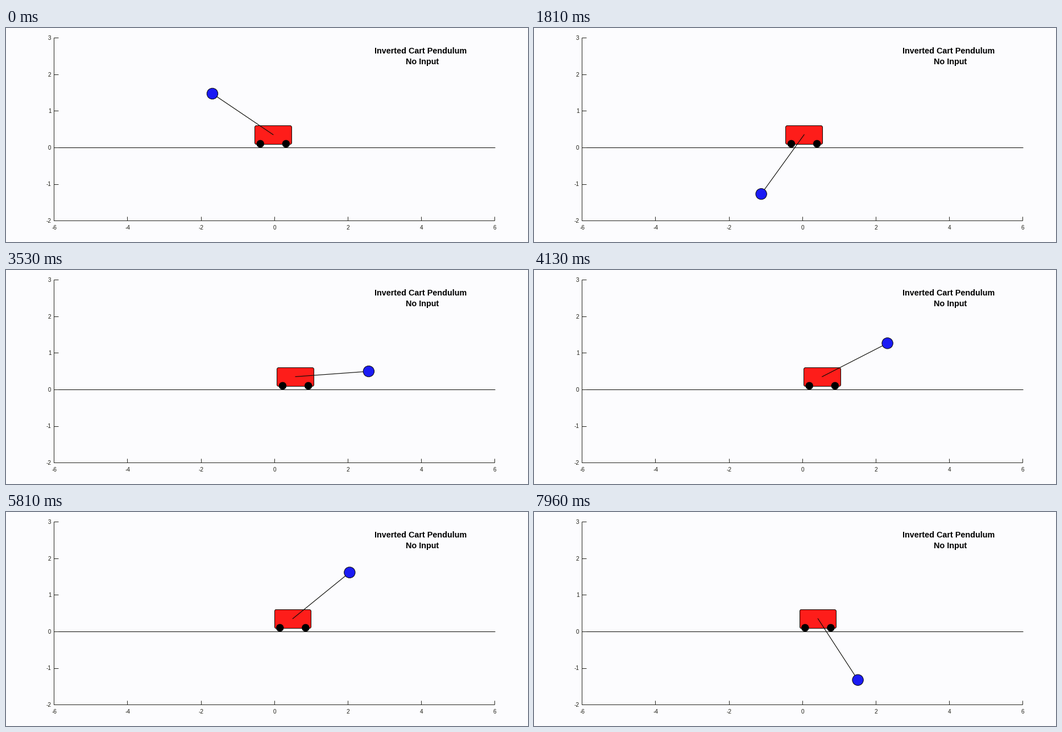
Animation of 918x378 px, one loop 8 s. Source, as a matplotlib script:

```python
import numpy as np
import matplotlib.pyplot as plt
from matplotlib.animation import FuncAnimation
from matplotlib.patches import Circle, FancyBboxPatch

W, H, DPI = 918, 378, 72
LOOP, INTERVAL = 8000, 20
SCALE, X0, Y0 = 64.55, 472.2, 211.0      # pixels per unit, pixel place of the origin
SNAP = 0.5 / SCALE                       # pixel snapping rounds half a pixel to the right
INK, AXIS, LABEL = "#0c0c08", "#262620", "#202018"

# Physics: frictionless cart with a free pendulum, released from rest
LENGTH, GRAVITY, MASS_RATIO = 2.0, 9.81, 1 / 6
START_ANGLE = -0.8
PIVOT_Y = 0.35
SIM_STEP, FIRST_STEP = 0.1, 3

# The plot redraws about every 300 ms, a little unevenly
REDRAWS = np.array([230, 520, 820, 1120, 1420, 1720, 2020, 2320, 2620,
                    2880, 3180, 3480, 3830, 4040, 4370, 4650, 4950, 5250,
                    5590, 5810, 6110, 6410, 6710, 7010, 7310, 7610, 7910])


def derivative(state):
    angle, speed = state
    s, c = np.sin(angle), np.cos(angle)
    accel = (GRAVITY / LENGTH * s - MASS_RATIO * speed**2 * s * c) / (1 - MASS_RATIO * c**2)
    return np.array([speed, accel])


def simulate(steps, substeps=20):
    """Angle from upright at every SIM_STEP, by Runge-Kutta."""
    h = SIM_STEP / substeps
    state = np.array([START_ANGLE, 0.0])
    angles = [state[0]]
    for _ in range(steps):
        for _ in range(substeps):
            k1 = derivative(state)
            k2 = derivative(state + h / 2 * k1)
            k3 = derivative(state + h / 2 * k2)
            k4 = derivative(state + h * k3)
            state = state + h / 6 * (k1 + 2 * k2 + 2 * k3 + k4)
        angles.append(state[0])
    return np.array(angles)


ANGLES = simulate(FIRST_STEP + len(REDRAWS))


def unit_x(px):
    return (px - X0) / SCALE


def unit_y(px):
    return (Y0 - px) / SCALE


fig = plt.figure(figsize=(W / DPI, H / DPI), dpi=DPI, facecolor="#fcfcfe")
ax = fig.add_axes([0, 0, 1, 1])
ax.set_xlim(unit_x(0), unit_x(W))
ax.set_ylim(unit_y(H), unit_y(0))
ax.axis("off")


def grid_line(xs, ys, color=AXIS):
    ax.plot(np.array(xs) - SNAP, ys, color=color, lw=1, zorder=1,
            solid_capstyle="butt", snap=True)


def label(x, y, text, size=10, color=LABEL, **kw):
    ax.text(x, y, text, fontsize=size, color=color, family="Liberation Sans",
            va="baseline", **kw)


def title(x, y, text):
    label(unit_x(x), unit_y(y), text, 14.4, "black", ha="center", weight="bold")


grid_line([-6, -6], [-2, 3])
grid_line([-6, 6], [-2, -2])
grid_line([-6, unit_x(860.5)], [0, 0], INK)
for v in range(-2, 4):
    grid_line([-6, unit_x(92.5)], [v, v])
    label(unit_x(79.5), v - 3.8 / SCALE, str(v), ha="right")
for v in range(-6, 7, 2):
    grid_line([v, v], [-2, unit_y(333)])
    label(v, unit_y(355.7), str(v), ha="center")
title(728.7, 45, "Inverted Cart Pendulum")
title(732.5, 64, "No Input")

cart = FancyBboxPatch((-0.5, 0.1), 1, 0.5, boxstyle="round,pad=0,rounding_size=0.045",
                      fc="#fe1d1a", ec=INK, lw=1, zorder=3, snap=True)
wheels = [Circle((0, 0.1), 0.1, fc="black", ec="black", lw=0.6, zorder=4) for _ in range(2)]
ball = Circle((0, 0), 0.15, fc="#1b1bf4", ec=INK, lw=1, zorder=6)
for patch in (cart, *wheels, ball):
    ax.add_patch(patch)
rod, = ax.plot([], [], color=INK, lw=1.15, zorder=5)


def update(frame):
    now = frame * INTERVAL + INTERVAL / 2
    step = FIRST_STEP + np.searchsorted(REDRAWS, now, side="right")
    angle = ANGLES[step]
    x = MASS_RATIO * LENGTH * (np.sin(angle) - np.sin(START_ANGLE))
    bx, by = x + LENGTH * np.sin(angle), PIVOT_Y + LENGTH * np.cos(angle)
    cart.set_x(x - 0.5 - SNAP)
    for wheel, offset in zip(wheels, (-0.35, 0.35)):
        wheel.center = (x + offset, 0.1)
    rod.set_data([x, bx], [PIVOT_Y, by])
    ball.center = (bx, by)
    return cart, *wheels, rod, ball


anim = FuncAnimation(fig, update, frames=LOOP // INTERVAL, interval=INTERVAL,
                     repeat=True, repeat_delay=0, blit=False)
plt.show()
```
